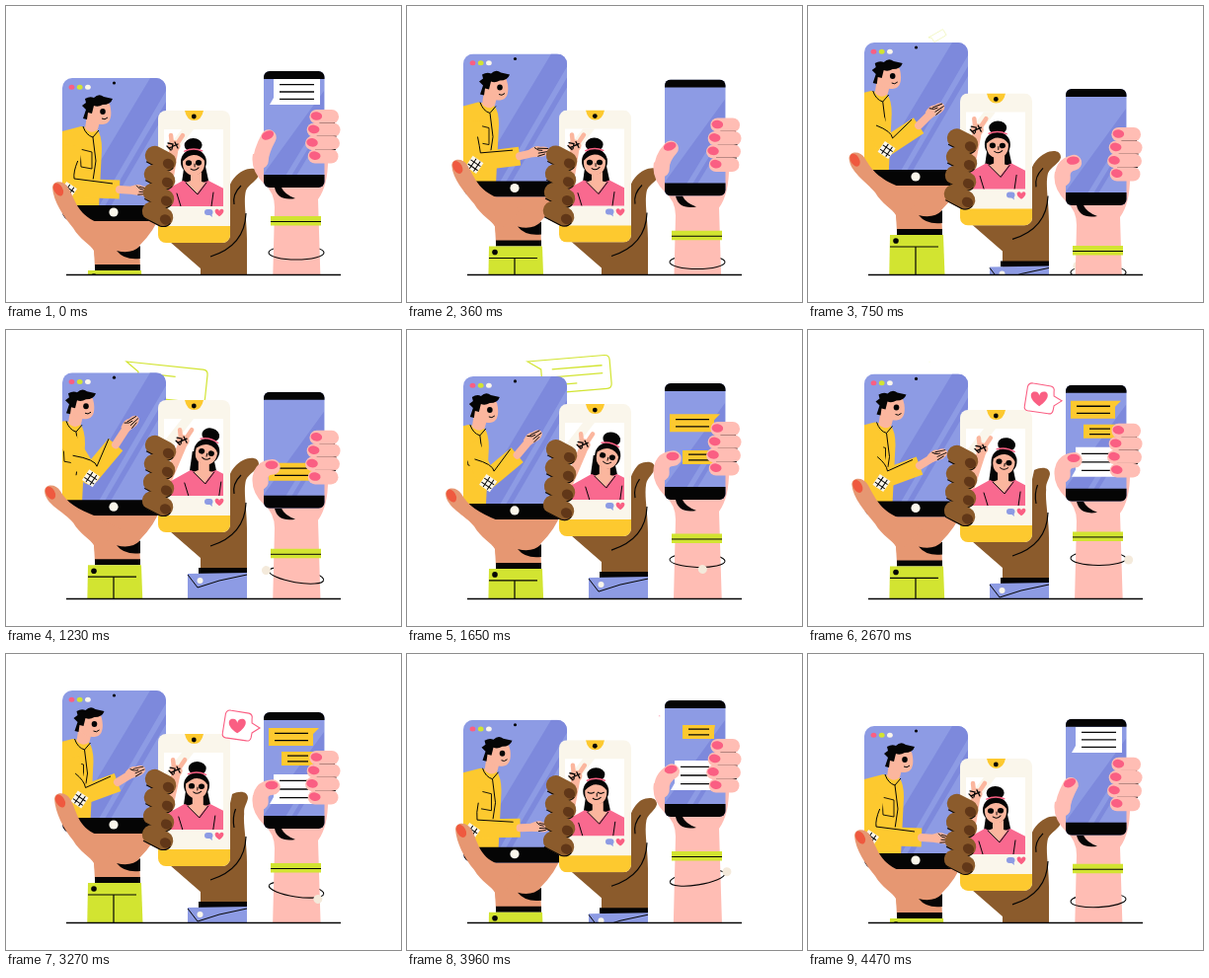
Recreate the animation shown at these times as an HTML page with a canvas. Size 400 by 300 pixels, loop 4.5 s.

```html
<!DOCTYPE html>
<html lang="en">
<head>
<meta charset="utf-8">
<title>Phones in hands</title>
<style>
html, body { margin: 0; width: 100%; height: 100%; overflow: hidden; background: #fff; }
canvas { display: block; }
</style>
</head>
<body>
<canvas id="stage" width="400" height="300"></canvas>
<script>
const ctx = document.getElementById('stage').getContext('2d');
const LOOP = 4500;
const INK = '#050505', BLUE = '#8d9be4', SHADE = '#7d89dc', YELLOW = '#fdc92f',
  LIME = '#d2e431', PINK = '#fa5f83', CREAM = '#faf6eb',
  TAN = '#e69772', BROWN = '#8b5b2c', ROSE = '#ffbdb4', FACE = '#fbb69e';

const clamp = x => Math.max(0, Math.min(1, x));
const ramp = (t, from, to) => { const u = clamp((t - from) / (to - from)); return u * u * (3 - 2 * u); };
const hump = (t, from, to) => Math.sin(Math.PI * clamp((t - from) / (to - from)));
// A resting value plus eased moves, each given as [amount, from, to].
const glide = (t, rest, ...moves) =>
  moves.reduce((sum, [amount, from, to]) => sum + amount * ramp(t, from, to), rest);

const leftTop = t => glide(t, 73, [-36, 0, 580], [36, 3300, 4200]) + 11 * hump(t, 750, 3270);
const middleTop = t => glide(t, 106, [-35, 300, 1200], [10, 1300, 2100], [25, 3700, 4500]);
const rightTop = t => glide(t, 66, [18, 0, 750], [-30, 750, 1500], [5, 2300, 3200], [-12, 3300, 3960], [19, 4130, 4500]);
const armRaise = t => glide(t, 0, [1, 0, 1150], [-.5, 1300, 2200], [-.5, 3300, 4200]);
const headLean = t => glide(t, 0, [13, 600, 1230], [-10, 2200, 3200], [-3, 3300, 4500]);
const thumbFold = t => glide(t, 0, [1, 0, 1000], [-1, 3500, 4500]);

function path(d, fill, stroke, width = 1.2) {
  const p = new Path2D(d);
  if (fill) { ctx.fillStyle = fill; ctx.fill(p); }
  if (stroke) { ctx.strokeStyle = stroke; ctx.lineWidth = width; ctx.stroke(p); }
}
function oval(x, y, rx, ry, fill, turn = 0) {
  ctx.beginPath();
  ctx.ellipse(x, y, rx, ry, turn, 0, 7);
  ctx.fillStyle = fill;
  ctx.fill();
}
function box(x, y, w, h, r, fill) {
  ctx.beginPath();
  ctx.roundRect(x, y, w, h, r);
  ctx.fillStyle = fill;
  ctx.fill();
}
function group(x, y, draw, turn = 0, scale = 1) {
  ctx.save();
  ctx.translate(x, y);
  ctx.rotate(turn);
  ctx.scale(scale, scale);
  draw();
  ctx.restore();
}
function clipped(x, y, w, h, r, draw) {
  ctx.save();
  ctx.beginPath();
  ctx.roundRect(x, y, w, h, r);
  ctx.clip();
  draw();
  ctx.restore();
}
function heart(x, y, size) {
  group(x, y, () => path('M0 .9C-1.5-.1-1.1-1-.5-.9Q-.1-.9 0-.4Q.1-.9 .6-.9C1.2-.9 1.4 0 0 .9Z', PINK), 0, size);
}

function greenBubble(t) {
  const size = ramp(t, 690, 900) * (1 - ramp(t, 2380, 2700));
  if (size < .01) return;
  const turn = glide(t, -30, [36, 780, 1230], [-13, 1230, 1500], [7, 1500, 1900]);
  group(122, 32, () => {
    path('M0 0H78Q83 0 83 5V29Q83 34 78 34H18Q13 34 13 29V9Z', null, LIME);
    for (let i = 0; i < 3; i++) {
      const grown = clamp((t - 1030 - i * 220) / 380);
      if (grown) path(`M24 ${10 + 8 * i}h${51 * grown}`, null, LIME, 1.3);
    }
  }, turn * Math.PI / 180, size);
}

function man(t) {
  const r = armRaise(t), x = 9 - 17 * r;
  const elbow = [66 + 23 * r, 111 - 7 * r], cuff = [115 - 4 * r, 113 - 40 * r], palm = [130 - 8 * r, 114 - 58 * r];
  group(x, 0, () => {
    path('M40 56L67 49L83 52Q88 58 88 72L85 132H40Z', YELLOW);
    path('M73 38L71 51Q78 58 84 52L87 40Z', FACE);
    path('M73 27Q74 21 86 21Q96 21 97 31Q99 46 89 47Q78 48 73 38Z', FACE);
    path('M69 41L72 32L68 28L72 25L71 21Q76 18 80 20Q85 15 90 19L99 21Q97 27 89 27Q84 30 80 28L78 36L74 35L73 42Z', INK);
    oval(89, 34, 2.8, 3, INK);
    path('M88 41Q91 43 94 40', null, INK, 1);
    path('M69 49Q72 58 79 60L85 53M79 60L82 84L79 104', null, INK, 1);
    path('M66 72L78 75V92L67 90Z', null, INK, .9);
  });
  const shoulder = 65 + x * .3;
  ctx.lineJoin = 'round';
  path(`M${shoulder} 68L${elbow[0] - 4} ${elbow[1]}L${cuff}`, null, YELLOW, 19);
  path(`M${shoulder + 5} 84Q${elbow[0] + 2} ${elbow[1] - 16} ${elbow[0] + 3} ${elbow[1] - 9}L${cuff[0] - 7} ${cuff[1] - 6}`, null, INK, 1);
  group(elbow[0] - 3, elbow[1] + 3, () => {
    box(-6.5, -6.5, 13, 13, 0, CREAM);
    path('M-6-2H6M-6 3H6M-2-6V6M3-6V6', null, INK, 1);
  }, .6);
  ctx.lineCap = 'round';
  path(`M${cuff}L${palm}`, null, FACE, 8);
  group(...palm, () => {
    path('M-4-4Q4-8 8-5Q15-5 16-1Q17 4 9 5L-2 4Z', FACE);
    path('M2-5Q5-1 9-1M5-4L15-2M5 1H15M4 4L11 3', null, INK, .9);
  }, .75 * Math.atan2(palm[1] - cuff[1], palm[0] - cuff[0]));
  ctx.lineCap = 'butt';
}

function leftPhone(t) {
  const x = glide(t, 50, [-8, 0, 1200], [10, 2100, 3200], [-2, 4000, 4500]);
  const y = glide(t, 107, [9, 0, 1200], [-10, 1300, 3200], [1, 3300, 4400]);
  group(0, leftTop(t), () => {
    path('M78 138H156Q151 154 135 170L136 192H90L89 174L78 160Z', TAN);
    path('M112 175Q127 179 136 170V183Q120 185 112 175Z', INK);
    box(90, 189, 46, 6, 0, INK);
    path('M83 195H137L139 250H82Z', LIME);
    oval(89, 201, 2.8, 2.8, INK);
    path('M83 207H132M109 207V250', null, INK);
    clipped(57, 0, 105, 145, 10, () => {
      box(57, 0, 105, 145, 0, BLUE);
      path('M146 0H162V13L94 130H68Z', SHADE);
      path('M162 24V34L106 130H100Z', SHADE);
      man(t);
      box(57, 129, 105, 16, 0, INK);
    });
    oval(109, 136, 4.6, 4.6, CREAM);
    oval(109.5, 5, 1.6, 1.6, INK);
    [PINK, LIME, CREAM].forEach((color, i) => oval(66.5 + i * 8.2, 9.3, 2.9, 2.5, color));
    path(`M${x - 3} ${y + 4}C${x - 2} ${y - 4} ${x + 9} ${y - 3} ${x + 13} ${y + 4}` +
      `C${x + 20} ${y + 16} 72 138 92 146L116 158L90 182L89 175C86 169 75 164 68 152` +
      `C58 140 ${x - 2} ${y + 18} ${x - 3} ${y + 4}Z`, TAN);
    oval(x + 3, y + 6, 4.4, 7, '#ef593f', -.5);
  });
}

function woman(t) {
  const lean = headLean(t), waveX = 170 + .7 * lean, waveY = 34 + .4 * lean;
  ctx.lineCap = 'round';
  path(`M163 82L${waveX} ${waveY + 5}`, null, FACE, 9);
  group(waveX, waveY, () => {
    path('M-2 0L-3-9M3 0L9-9', null, FACE, 4.5);
    oval(0, 2, 6.5, 6, FACE);
    path('M-6-1l5 1l-1 5M-5 4l9-4M1-2l3 6M-7 2l4 4', null, INK, 1.3);
  });
  group(lean * .6, 0, () => {
    path('M181 52H201L207 80H177Z', INK);
    path('M152 86L179 71L192 76L205 71L230 84V99H152Z', '#f9698f');
    path('M187 62H198V72L202 73L193 84L182 73L187 71Z', FACE);
    path('M182 73L194 85L203 73M173 84L177 97M210 83L208 97', null, INK, 1);
  });
  group(190 + lean, 53, () => {
    oval(0, -18, 9, 7, INK);
    oval(0, -1, 13, 13, INK);
    path('M-11-2Q-5-8 0-8Q7-8 11-2Q12 11 0 13Q-12 11-11-2Z', FACE);
    path('M-9-12Q0-16 9-12', null, PINK, 1.5);
    const blink = Math.min(Math.abs(t - 2070), Math.abs(t - 3960)) < 120;
    for (const eye of [-5, 5]) {
      if (blink) path(`M${eye - 3} 0q3 2 6 0`, null, INK);
      else oval(eye, 0, 3.1, 2.8, INK);
    }
    path('M-3 6Q1 9 5 5M1 1L1 4', null, INK, 1);
  }, (lean - 1) * .02);
  ctx.lineCap = 'butt';
}

function middlePhone(t) {
  const d = glide(t, 0, [-11, 1300, 2050], [11, 3500, 4200]), bend = d / 2;
  group(0, middleTop(t), () => {
    path(`M224 84C227 70 ${234 + bend} 64 ${240 + d} 61C${248 + d} 57 ${256 + d} 58 ${256 + d} 65` +
      `C${255 + d} 71 ${246 + bend} 74 ${243 + bend / 3} 81C240 93 244 110 244 130V210H197V160` +
      'L166 133L220 124Z', BROWN);
    path(`M${238 + bend} 76Q229 85 231 95M243 104Q242 137 207 148`, null, INK);
    box(195, 170, 49, 6, 0, INK);
    path('M184 176L244 175V240H184Z', BLUE);
    path('M184 177L194 190L216 183L244 177', null, INK, 1);
    oval(196.5, 183, 3, 3, CREAM);
    clipped(154, 0, 73, 134, 8, () => {
      box(154, 0, 73, 134, 0, CREAM);
      path('M181 0H200Q198 10 190.5 10Q183 10 181 0Z', YELLOW);
      oval(190.3, 6, 2.4, 2.4, INK);
      box(160, 19, 60, 78, 0, '#fff');
      path('M178 19H190L160 58V42Z', CREAM);
      clipped(160, 17, 60, 80, 0, () => woman(t));
      box(154, 117, 73, 17, 0, YELLOW);
    });
    box(201, 100, 8.5, 6, 3, BLUE);
    path('M205 105L209 108L208 103Z', BLUE);
    heart(216, 103.5, 4.2);
    for (let i = 0; i < 4; i++) group(157 - i, 49 + 18.8 * i, () => {
      box(-17, -9.8, 33, 19.6, 9.8, BROWN);
      path('M-12 9.4H7Q14 8 15 2', null, INK, 1);
      oval(9, 1, 5.8, 5, '#613718');
    }, .48);
  });
}

function message(x, y, w, h, color, lines, tail, size = 1) {
  if (size <= 0) return;
  group(x, y, () => {
    path(tail < 0 ? `M0 0H${w}V${h}H-4L0 ${h - 7}Z` : `M0 0H${w + tail}L${w - 1} 6V${h}H0Z`, color);
    for (let i = 0; i < lines; i++)
      path(`M6 ${h * (i + .75) / (lines + .5)}H${w - 6}`, null, INK, 1.3);
  }, 0, size);
}

function messages(t) {
  const first = glide(t, 72, [-56, 1270, 1850], [-50, 3440, 3860]);
  const second = glide(t, 68, [-28, 1650, 1980], [-15, 3550, 3960], [-48, 3960, 4300]);
  message(266, first, 46, 18, YELLOW, 2, 5, ramp(t, 1040, 1200));
  message(279, second, 33, 14, YELLOW, 2, 0, ramp(t, 1450, 1650));
  const leaving = t < 600;
  const last = leaving ? glide(t, 8, [-48, 30, 500]) : glide(t, 63, [-2, 3300, 3900], [-53, 3970, 4490]);
  const grow = leaving ? 1 : ramp(t, 3960, 4400);
  message(271, last, 41 + 6 * grow, 30 - 4 * grow, '#fff', 3, -1, leaving ? 1 : ramp(t, 1780, 2020));
}

function ring(t, band, front) {
  const degrees = glide(t, 270, [-90, 300, 1230], [-200, 1230, 2070], [62, 2200, 3200], [-52, 3300, 3960], [-80, 3960, 4500]);
  const angle = degrees * Math.PI / 180;
  const tilt = .17 * Math.sin(2 * Math.PI * Math.max(0, t - 755) / 1900);
  group(294, band + glide(t, 37, [-10, 0, 700], [10, 4000, 4500]), () => {
    ctx.beginPath();
    ctx.ellipse(0, 0, 28, 7, 0, front ? 0 : Math.PI, front ? Math.PI : Math.PI * 2);
    ctx.strokeStyle = INK;
    ctx.lineWidth = 1.1;
    ctx.stroke();
    if (Math.sin(angle) >= -.4 === front) oval(31 * Math.cos(angle), 9 * Math.sin(angle), 4.5, 4.5, '#f4eadb');
  }, tilt);
}

function heartBubble(t, top) {
  const size = glide(t, 0, [.99, 1880, 2230], [-.93, 3620, 3940], [-.06, 3960, 4020]);
  if (size < .01) return;
  group(257, top + 16, () => {
    path('M0 0L-8 5L-9 10Q-10 14-14 13L-35 10Q-39 9-38 5L-35-14Q-34-19-29-18L-11-15Q-7-14-8-9L-8-5Z', '#fff', PINK, 1.1);
    heart(-23, -2, 8.2);
  }, 0, size);
}

function rightPhone(t) {
  const top = rightTop(t), fold = thumbFold(t), tipX = 266 + 4 * fold, tipY = 67 + 9 * fold;
  const band = top + glide(t, 147, [12, 0, 700], [-13, 1300, 2000], [7, 2300, 3200], [-6, 4000, 4500]);
  ring(t, band, false);
  group(0, top, () => {
    path('M250 84Q247 100 261 114Q272 123 272 138L269 260H320L316 130Q327 115 326 84Z', ROSE);
    path('M272 118H279Q282 125 293 129Q275 132 272 118Z', INK);
    clipped(261, 0, 61.5, 118, 6, () => {
      box(261, 0, 62, 118, 0, BLUE);
      path('M322 20V42L283 106H261V104Z', SHADE);
      path('M322 52V60L294 106H289Z', SHADE);
      clipped(261, 8, 62, 97, 0, () => messages(t));
      box(261, 0, 62, 8, 0, INK);
      box(261, 105, 62, 13, 0, INK);
    });
    ctx.lineCap = 'round';
    path(`M258 91Q${258 - 2 * fold} ${82 - 5 * fold} ${tipX} ${tipY}`, null, ROSE, 15.5);
    ctx.lineCap = 'butt';
    oval(tipX - 1, tipY - 2, 6.5, 4.2, PINK, -.45 * (1 - fold));
    for (let i = 0; i < 4; i++) {
      const x = 302.5 + 2.7 * Math.abs(i - 1.8), y = 46 + 13.4 * i, end = 339 - 1.5 * Math.abs(i - 1.3);
      box(x, y - 7, end - x, 14.4, 7.2, ROSE);
      oval(x + 7, y - .5, 5.8, 4.3, PINK, .15);
      if (i < 3) path(`M${x + 10} ${y + 6.8}H${end - 4}`, null, INK, .9);
    }
  });
  box(268, band, 51, 9.5, 0, LIME);
  path(`M268 ${band + 5.5}h51`, null, INK, 1);
  ring(t, band, true);
  heartBubble(t, top);
}

function draw(t) {
  ctx.fillStyle = '#fff';
  ctx.fillRect(0, 0, 400, 300);
  clipped(0, 0, 400, 272, 0, () => {
    greenBubble(t);
    leftPhone(t);
    middlePhone(t);
    rightPhone(t);
  });
  path('M61 272.5H339', null, INK, 1.4);
}

const start = performance.now();
function frame() {
  draw((performance.now() - start) % LOOP);
  requestAnimationFrame(frame);
}
frame();
</script>
</body>
</html>
```
